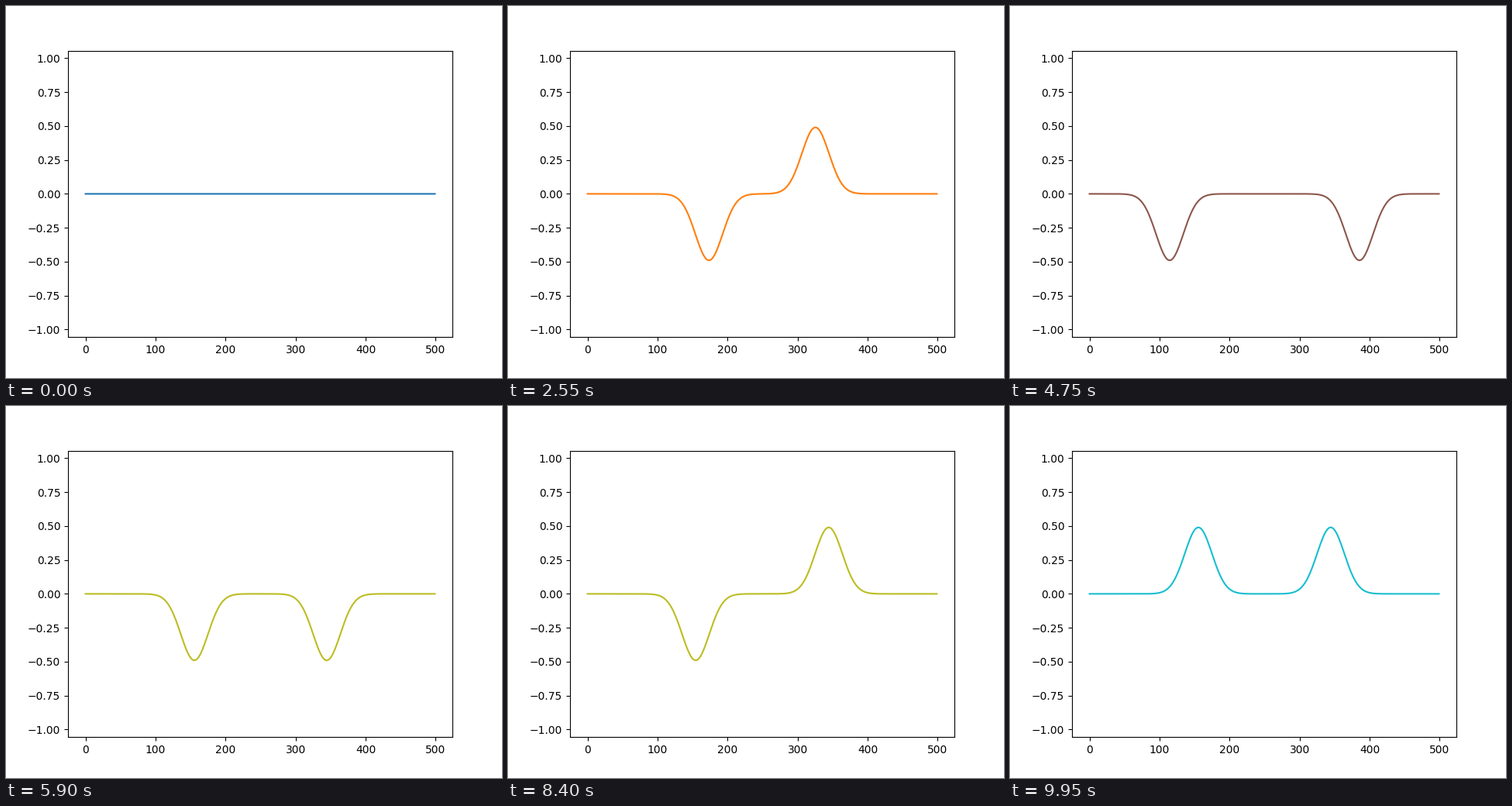
A matplotlib script for the animation above (10000 ms loop, 640x480 px).

```python
import numpy as np
import matplotlib.pyplot as plt
from matplotlib.animation import FuncAnimation

FRAMES = 200
INTERVAL = 50       # ms
SPEED = 10          # cells per frame
CELLS = 500
WALL = 499.5        # free end; the end at 0 is fixed
SOURCE = 250
DELAY = 86.5        # time of the pulse's peak, in cells travelled
SPREAD = 19.4
AMPLITUDE = 0.49

x = np.arange(CELLS)


def pulse(origin, time):
    """Wave spreading both ways from one origin."""
    lag = time - np.abs(x - origin) - DELAY
    return AMPLITUDE * np.exp(-0.5 * (lag / SPREAD) ** 2)


def field(time):
    """Sum of the source and its mirror images behind both ends."""
    total = np.zeros(CELLS)
    for m in range(-2, 3):
        shift = 2 * m * WALL
        pair = pulse(shift + SOURCE, time) - pulse(shift - SOURCE, time)
        total += (-1) ** m * pair
    return total


fig, ax = plt.subplots(figsize=(6.4, 4.8), dpi=100)
margin = 0.05 * (CELLS - 1)
ax.set_xlim(-margin, CELLS - 1 + margin)
ax.set_ylim(-1.056, 1.056)
line, = ax.plot(x, np.zeros(CELLS))


def update(frame):
    line.set_ydata(field(SPEED * frame))
    line.set_color(f"C{frame % 10}")
    return line,


anim = FuncAnimation(fig, update, frames=FRAMES, interval=INTERVAL,
                     repeat=True, repeat_delay=0)
plt.show()
```
